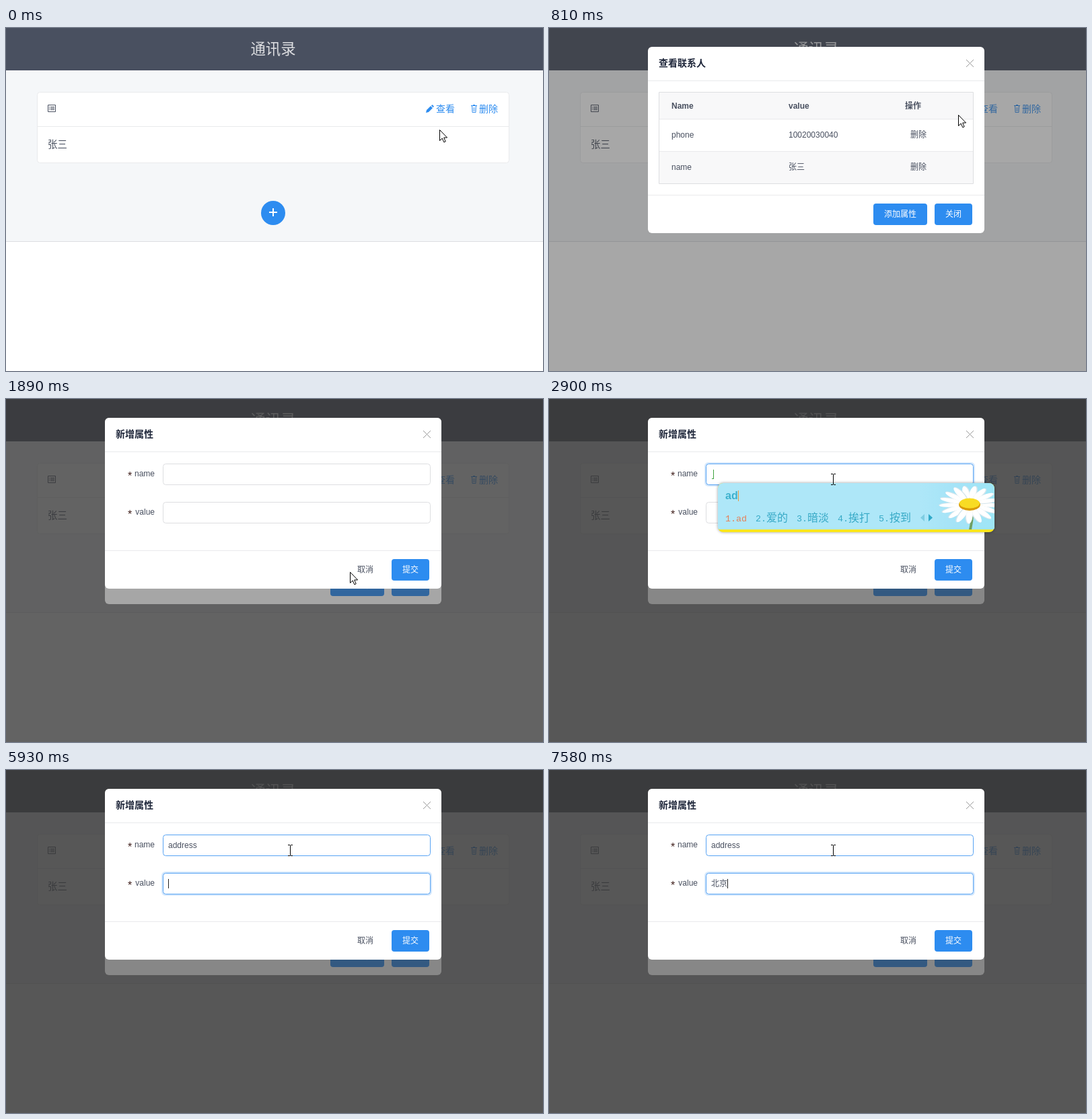
Animation, 798 px wide and 510 px high, one loop 8000 ms. Source, as an HTML page with a canvas:

```html
<!DOCTYPE html>
<html lang="zh-CN">
<head>
<meta charset="utf-8">
<title>通讯录</title>
<style>
html, body { margin: 0; width: 100%; height: 100%; overflow: hidden; background: #fff; }
canvas { display: block; }
</style>
</head>
<body>
<canvas id="stage" width="798" height="510"></canvas>
<script>
const c = document.getElementById('stage').getContext('2d');
const LOOP = 8000, STEP = 76.6, FIRST = 120;
const SANS = '"Liberation Sans", "Noto Sans CJK SC", "Noto Sans CJK", sans-serif';
const MONO = '"Liberation Mono", monospace';
const BLUE = '#2d8cf0', LIGHT = '#57a3f3', BODY = '#495060', DARK = '#1c2438';
const BORDER = '#dddee1', RULE = '#e9eaec', STRIPE = '#f8f8f9';

const clamp = v => Math.max(0, Math.min(1, v));
const smooth = v => v * v * (3 - 2 * v);
const ramp = (t, start, len) => clamp((t - start) / len);

function rect(x, y, w, h, color) {
  c.fillStyle = color;
  c.fillRect(x, y, w, h);
}

function box(x, y, w, h, r, fill, stroke) {
  c.beginPath();
  if (stroke) c.roundRect(x + .5, y + .5, w - 1, h - 1, r);
  else c.roundRect(x, y, w, h, r);
  c.fillStyle = fill;
  c.fill();
  if (stroke) {
    c.strokeStyle = stroke;
    c.lineWidth = 1;
    c.stroke();
  }
}

function text(s, x, y, size, color, weight = 400, align = 'left', family = SANS) {
  c.font = `${weight} ${size}px ${family}`;
  c.textAlign = align;
  c.fillStyle = color;
  c.fillText(s, x, y);
}

function path(points, x = 0, y = 0) {
  c.beginPath();
  points.forEach(([px, py], i) => i ? c.lineTo(x + px, y + py) : c.moveTo(x + px, y + py));
}

function line(x1, y1, x2, y2, color, width = 1) {
  path([[x1, y1], [x2, y2]]);
  c.strokeStyle = color;
  c.lineWidth = width;
  c.stroke();
}

function button(label, x, y, w, fill = BLUE) {
  box(x, y, w, 32, 4, fill);
  text(label, x + w / 2, y + 20, 12, '#fff', 500, 'center');
}

// Page

function listIcon(x, y) {
  c.strokeStyle = BODY;
  c.lineWidth = 1;
  c.strokeRect(x + .5, y + .5, 11, 10);
  for (let i = 0; i < 3; i++) {
    rect(x + 2, y + 3 + i * 2, 1, 1, BODY);
    rect(x + 4, y + 3 + i * 2, 6, 1, BODY);
  }
}

function pencil(x, y, color) {
  c.fillStyle = color;
  path([[0, 12], [1, 8], [7, 2], [10, 5], [4, 11]], x, y);
  c.fill();
  path([[8, 1.4], [9.4, 0], [12, 2.6], [10.6, 4]], x, y);
  c.fill();
}

function trash(x, y, color) {
  rect(x, y + 1, 9, 1, color);
  rect(x + 3, y, 3, 1, color);
  path([[1.5, 2], [2, 11.5], [7, 11.5], [7.5, 2]], x, y);
  c.strokeStyle = color;
  c.lineWidth = .9;
  c.stroke();
  rect(x + 3.2, y + 4, .7, 6, color);
  rect(x + 5.2, y + 4, .7, 6, color);
}

function page(linkHover) {
  const link = linkHover ? LIGHT : BLUE;
  rect(0, 0, 798, 510, '#fff');
  rect(0, 63, 798, 254, '#f5f7f9');
  rect(0, 317, 798, 1, BORDER);
  rect(0, 0, 798, 63, BODY);
  text('通讯录', 397, 39, 22.4, '#dddee1', 400, 'center');
  box(46, 95, 702, 106, 4, '#fff', RULE);
  rect(47, 146, 700, 1, RULE);
  listIcon(62, 114);
  pencil(624, 114, link);
  text('查看', 639, 125, 14, link);
  trash(691, 114, BLUE);
  text('删除', 703, 125, 14, BLUE);
  text('张三', 62, 178, 14.4, BODY);
  c.beginPath();
  c.arc(397, 275, 18, 0, 7);
  c.fillStyle = BLUE;
  c.fill();
  rect(391, 273, 12, 2, '#fff');
  rect(396, 268, 2, 12, '#fff');
}

// Dialogs

function dialog(p, h, title, body) {
  const k = .9 + .1 * smooth(p);
  c.save();
  c.globalAlpha = smooth(p);
  c.translate(397, 28 + h / 2);
  c.scale(k, k);
  c.translate(-397, -28 - h / 2);
  box(147, 28, 500, h, 6, '#fff');
  rect(147, 78, 500, 1, RULE);
  rect(147, h - 29, 500, 1, RULE);
  text(title, 163, 57, 14, DARK, 700);
  line(620, 47, 631, 58, '#999');
  line(631, 47, 620, 58, '#999');
  body();
  c.restore();
}

function mask(p) {
  rect(0, 0, 798, 510, `rgba(55,55,55,${.6 * p})`);
}

function contact(hover) {
  box(163, 95, 468, 137, 0, '#fff', BORDER);
  rect(164, 96, 466, 39, STRIPE);
  rect(164, 184, 466, 47, STRIPE);
  rect(164, 135, 466, 1, RULE);
  rect(164, 183, 466, 1, RULE);
  const row = (cells, y, weight, lastX) =>
    cells.forEach((s, i) => text(s, [182, 356, lastX][i], y, 12, BODY, weight));
  row(['Name', 'value', '操作'], 120, 700, 529);
  row(['phone', '10020030040', '删除'], 163, 400, 537);
  row(['name', '张三', '删除'], 211, 400, 537);
  button('添加属性', 482, 261, 80, hover ? LIGHT : BLUE);
  button('关闭', 573, 261, 56);
}

function field(label, value, y, glow, lit) {
  text('*', 184, y + 24, 16, '#40201c', 400, 'center');
  text(label, 221, y + 19, 12, BODY, 400, 'right');
  if (glow > 0) box(231, y - 2, 402, 36, 6, `rgba(45,140,240,${.2 * glow})`);
  box(233, y, 398, 32, 4, '#fff', lit ? LIGHT : BORDER);
  text(value, 241, y + 20, 12, BODY);
}

const between = (t, a, b) => t >= a && t < b;

function caret(t) {
  if (between(t, 2430, 2500)) rect(241, 105, 1, 14, '#222');
  if (between(t, 2500, 4070)) {
    rect(244, 105, 1, 14, '#3fa33f');
    rect(242, 118, 2, 1, '#3fa33f');
  }
  if (between(t, 4070, 4610)) rect(284, 105, 1, 14, '#222');
  if (between(t, 4850, 5400) || between(t, 5930, 6480) || between(t, 6950, 7110))
    rect(241, 162, 1, 14, '#222');
  if (t >= 7580) rect(265, 162, 1, 14, '#222');
}

function form(t, hover) {
  const toValue = ramp(t, 4800, 150);
  const inName = ramp(t, 2390, 80) * (1 - toValue);
  field('name', t >= 4070 ? 'address' : '', 96, inName, hover || inName > 0);
  field('value', t >= 7580 ? '北京' : '', 153, toValue, toValue > 0);
  caret(t);
  text('取消', 522, 258, 12, BODY);
  button('提交', 573, 238, 56);
}

// Input method window: [start, typed letters, candidates]

const TYPING = [
  [2500, 'a', 'a 啊 爱 按 安'],
  [2900, 'ad', 'ad 爱的 暗淡 挨打 按到'],
  [3050, 'add', 'add 安定点的 挨打的 按到底 暗淡的'],
  [3450, 'addr', 'addr 安定的人 挨打的人 爱的人 按到人'],
  [3600, 'addre', 'addre 爱到大热 按到的热 安定热 挨打热'],
  [3750, 'addres', 'addres 安定的人生 爱的人生 挨打 按到'],
  [3920, 'address', 'address 爱的人生 安定 挨打 按到'],
  [4070, ''],
  [7110, 'b', '不 把 被 比 本'],
  [7410, 'bj', '北京 不仅 背景 比较 布局'],
  [7580, '']
];

const charWidth = ch => ch < '\x7f' ? 8 : 16;

function ellipse(x, y, rx, ry, fill, angle = 0) {
  c.beginPath();
  c.ellipse(x, y, rx, ry, angle, 0, 7);
  c.fillStyle = fill;
  c.fill();
}

function daisy(x, y) {
  c.beginPath();
  c.moveTo(x + 4, y + 12);
  c.quadraticCurveTo(x + 4, y + 28, x, y + 42);
  c.strokeStyle = '#6f9f62';
  c.lineWidth = 4;
  c.stroke();
  for (let i = 0; i < 17; i++) {
    c.save();
    c.translate(x, y);
    c.scale(1, .62);
    c.rotate(i * 2.22 + .1);
    ellipse(27, 0, 21 - i % 3 * 2, 5.6, '#d5e5ec');
    ellipse(27, -.8, 20 - i % 3 * 2, 4.8, '#fff');
    c.restore();
  }
  ellipse(x, y + 1, 16, 9, '#d99c08');
  ellipse(x, y - 1, 15, 7.5, '#f8dc24');
}

function inputWindow(t) {
  const state = TYPING.filter(s => s[0] <= t).pop();
  if (!state || !state[1]) return;
  const [start, typed, list] = state;
  const items = list.split(' ').map((s, i) => `${i + 1}.${s}`);
  const span = items.reduce((sum, s) => sum + [...s].reduce((n, ch) => n + charWidth(ch), 0), 0);
  const end = 262 + span + 13 * (items.length - 1);
  const right = end + 124;
  c.save();
  if (start > 5000) c.translate(0, 57);
  c.shadowColor = 'rgba(0,0,0,.4)';
  c.shadowBlur = 4;
  box(251, 125, right - 251, 73, 8, '#fbe61e');
  c.shadowColor = 'transparent';
  c.beginPath();
  c.roundRect(251, 125, right - 251, 69, [8, 8, 3, 3]);
  c.clip();
  const sky = c.createLinearGradient(right - 110, 0, right, 0);
  sky.addColorStop(0, '#aee7f8');
  sky.addColorStop(.5, '#a4e3f7');
  sky.addColorStop(1, '#9ee6f6');
  rect(251, 125, right - 251, 69, sky);
  daisy(right - 37, 156);
  text(typed, 262, 149, 16, '#3db1cd', 700);
  rect(262 + Math.round(c.measureText(typed).width), 136, 1, 16, '#e89a3c');
  let x = 262;
  items.forEach((s, i) => {
    for (const ch of s) {
      const ascii = ch < '\x7f';
      text(ch, x, 182, ascii ? 13.33 : 16, i ? '#36a9c6' : '#e58058', ascii ? 400 : 300, 'left', ascii ? MONO : SANS);
      x += charWidth(ch);
    }
    x += 13;
  });
  c.fillStyle = '#7fcde2';
  path([[20, 171], [20, 182], [14, 176.5]], end, 0);
  c.fill();
  c.fillStyle = '#2fa9c8';
  path([[26, 171], [26, 182], [32, 176.5]], end, 0);
  c.fill();
  c.restore();
}

// Pointer

const ROUTE = [
  [0, 644, 151], [43, 644, 151], [349, 645, 117], [580, 645, 117],
  [809, 608, 129], [1268, 517, 267], [1850, 517, 267], [2340, 422, 119]
];

function pointer(t) {
  const i = ROUTE.findIndex(k => k[0] > t);
  if (i < 0) return ROUTE[ROUTE.length - 1].slice(1);
  const [t0, x0, y0] = ROUTE[i - 1], [t1, x1, y1] = ROUTE[i];
  const p = (t - t0) / (t1 - t0);
  return [Math.round(x0 + (x1 - x0) * p), Math.round(y0 + (y1 - y0) * p)];
}

function outline(width = 1) {
  c.fillStyle = '#fff';
  c.fill();
  c.strokeStyle = '#000';
  c.lineWidth = width;
  c.lineJoin = 'round';
  c.stroke();
}

function arrow(x, y) {
  path([[.5, .5], [.5, 16.5], [4.2, 13], [6.8, 18.8], [9.2, 17.8], [6.7, 12], [11.6, 12]], x, y);
  c.closePath();
  outline();
}

function hand(x, y) {
  c.save();
  c.translate(x, y);
  c.beginPath();
  c.moveTo(-1.5, 13);
  c.lineTo(-1.5, 1.5);
  c.quadraticCurveTo(0, -1, 1.8, 1.5);
  c.lineTo(1.8, 7);
  c.quadraticCurveTo(4, 5.6, 5, 8);
  c.quadraticCurveTo(7.4, 6.8, 8, 9);
  c.quadraticCurveTo(10.5, 8.4, 10.5, 11);
  c.lineTo(10.5, 16);
  c.lineTo(8.5, 20);
  c.lineTo(8.5, 23);
  c.lineTo(-.5, 23);
  c.lineTo(-.5, 20);
  c.quadraticCurveTo(-3.5, 16, -6, 13);
  c.quadraticCurveTo(-6.4, 10, -3.8, 10.8);
  c.closePath();
  outline(1.2);
  [1.8, 5, 8].forEach(fx => line(fx, 7.5, fx, 12, '#000'));
  c.restore();
}

function beam(x, y) {
  rect(x, y - 7, 1, 15, '#000');
  [y - 8, y + 8].forEach(by => {
    rect(x - 3, by, 3, 1, '#000');
    rect(x + 1, by, 3, 1, '#000');
  });
}

function draw(t) {
  // The screen refreshes at a fixed step while things move.
  const q = Math.max(0, FIRST + Math.floor((t - FIRST) / STEP) * STEP);
  const [x, y] = pointer(q);
  const onLink = q < 580 && y < 132;
  const onButton = between(q, 1000, 1700) && x >= 482 && x < 562 && y >= 261;
  const onField = q > 1900 && y < 128;

  page(onLink);
  if (q >= 500) {
    mask(ramp(q, 480, 450));
    dialog(ramp(q, 480, 300), 277, '查看联系人', () => contact(between(q, 1420, 1800)));
  }
  if (q >= 1570) {
    mask(ramp(q, 1550, 450));
    dialog(ramp(q, 1550, 300), 254, '新增属性', () => form(t, onField));
  }
  inputWindow(t);
  (onLink || onButton ? hand : onField ? beam : arrow)(x, y);
}

function tick() {
  draw(performance.now() % LOOP);
  requestAnimationFrame(tick);
}
tick();
</script>
</body>
</html>
```
